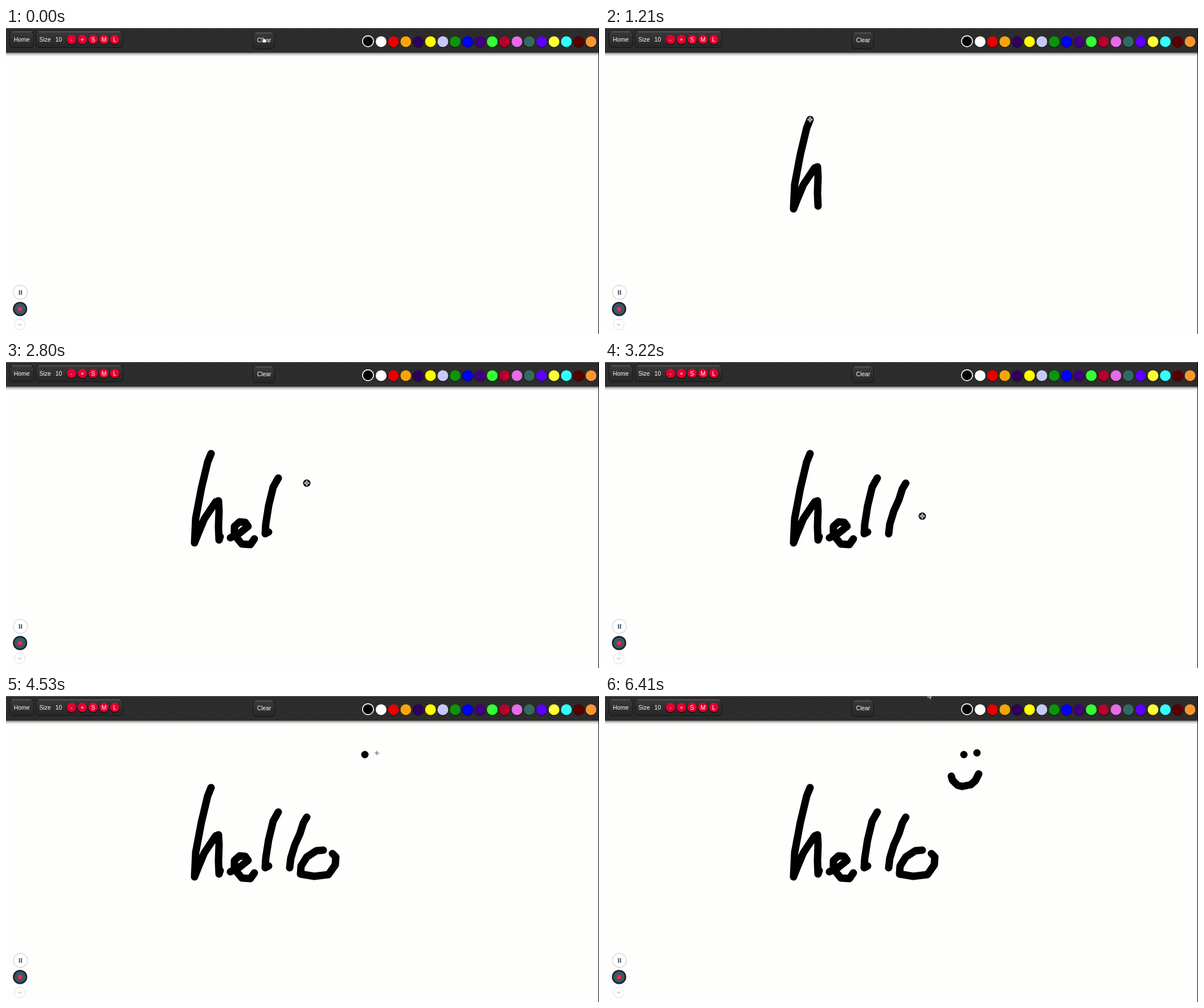
Recreate the animation shown at these times as an HTML page. Size 1041x538 px, loop 6.49 s.

```html
<!DOCTYPE html>
<html lang="en">
<head>
<meta charset="utf-8">
<title>Drawing board</title>
<style>
  html, body { margin: 0; width: 100%; height: 100%; overflow: hidden; background: #fefefc; }
  svg { display: block; width: 1041px; height: 538px; }
  text { font: 10.4px "Liberation Sans", Arial, sans-serif; fill: #fff; }
  .mid { text-anchor: middle; }
  .btn { fill: url(#face); stroke: #151515; }
  .ink { fill: none; stroke: #000; stroke-width: 13; stroke-linecap: round; stroke-linejoin: round; }
</style>
</head>
<body>
<svg viewBox="0 0 1041 538">
  <defs>
    <pattern id="weave" width="4" height="4" patternUnits="userSpaceOnUse">
      <rect width="4" height="4" fill="#303030"/>
      <path d="M0 0h1v1h1v1h1v1h1v1h-1v-1h-1v-1h-1v-1h-1z" fill="#222"/>
    </pattern>
    <linearGradient id="face" x2="0" y2="1">
      <stop stop-color="#393939"/><stop offset="1" stop-color="#262626"/>
    </linearGradient>
    <linearGradient id="shade" x2="0" y2="1">
      <stop stop-color="#000" stop-opacity=".65"/>
      <stop offset=".4" stop-color="#000" stop-opacity=".2"/>
      <stop offset="1" stop-color="#000" stop-opacity="0"/>
    </linearGradient>
  </defs>
  <rect width="1041" height="538" fill="#fefefc"/>
  <rect y="43" width="1041" height="7" fill="url(#shade)"/>
  <rect width="1041" height="43" fill="url(#weave)"/>
  <rect width="1041" height="1" fill="#666"/>
  <g id="bar"></g>
  <text x="13.7" y="23.7">Home</text>
  <text x="58.5" y="23.5">Size</text>
  <text x="86.7" y="23.5">10</text>
  <text x="440.7" y="25">Clear</text>

  <circle cx="25.3" cy="464.8" r="12.3" fill="#fff" stroke="#e2e2e4" stroke-width="2"/>
  <path d="M23.7 461v8M27.2 461v8" stroke="#4b5b6c" stroke-width="2"/>
  <circle cx="24.7" cy="494" r="11.2" fill="#3e5566" stroke="#1b2833" stroke-width="2.8"/>
  <rect x="21.2" y="490.7" width="7" height="7" fill="#e7313d"/>
  <circle cx="24.2" cy="521.3" r="9.4" fill="#fff" stroke="#ddd"/>
  <path d="M20.8 520l3.4 3 3.4-3" fill="none" stroke="#999"/>

  <g id="ink"></g>
  <g id="cross" fill="none">
    <path d="M-4.5 0h9M0-4.5v9" stroke="#fff" stroke-width="3"/>
    <path d="M-4 0h8M0-4v8" stroke="#444"/>
  </g>
  <path id="hand" d="M-1-3v5l-1-1-1 1 2 4h5l1-3v-3l-4-1v-2q-1-1-2 0z" fill="#fff" stroke="#222" stroke-width=".8"/>
  <path id="arrow" d="M0 0v9l2-2 1.6 3.7 1.6-.7-1.6-3.5h3z" fill="#222" stroke="#fff" stroke-width=".9"/>
  <path d="M1040.5 0v538" stroke="#000"/>
</svg>
<script>
const $ = id => document.getElementById(id);
const LOOP = 6490;

function add(parent, tag, attrs, text = "") {
  const el = document.createElementNS("http://www.w3.org/2000/svg", tag);
  for (const k in attrs) el.setAttribute(k, attrs[k]);
  el.textContent = text;
  return parent.appendChild(el);
}

const bar = $("bar");
for (const [x, y, width] of [[6.5, 6.5, 42], [53, 6.5, 152], [433.5, 8.5, 38]]) {
  add(bar, "rect", { x, y, width, height: 28, rx: 5, class: "btn" });
  add(bar, "path", { d: `M${x + 4} ${y + .2}h${width - 8}`, stroke: "#737373" });
}
[..."-+SML"].forEach((label, i) => {
  const x = 115 + i * 19;
  add(bar, "circle", { cx: x, cy: 20.8, r: 8.8, fill: "#111" });
  add(bar, "circle", { cx: x, cy: 20, r: 8.2, fill: "#e5002f" });
  add(bar, "text", { x, y: 23.5, class: "mid" }, label);
});
add(bar, "circle", { cx: 635.5, cy: 23.2, r: 9.6, fill: "#000", stroke: "#fff", "stroke-width": 1.7 });
("#fff #e80000 #f9a50a #2d0060 #ff0 #c8c8f8 #0a960a #00f #400080 #3f3 #b8002c " +
 "#e66be6 #336b60 #5b00ff #ff3 #3ff #590000 #fa9632").split(" ").forEach((fill, i) => {
  const cx = 658.5 + i * 21.68;
  add(bar, "circle", { cx, cy: 24.6, r: 10.2, fill: "#151515" });
  add(bar, "circle", { cx, cy: 24, r: 9.5, fill });
});

// Pen strokes: start time, end time, points sampled at even intervals
const strokes = [
  [700, 1250, "360,161 354,176 343,222 333,275 331,318 338,300 348,276 368,246 373,244 374,262 373,290 374,313 376,307"],
  [1500, 1960, "394,309 410,301 425,289 420,282 410,281 401,289 401,304 414,320 429,321 436,311"],
  [2180, 2440, "478,204 469,220 461,253 456,285 455,302 461,299"],
  [2800, 3030, "528,213 522,223 516,242 507,262 500,285 498,302"],
  [3180, 3590, "557,271 545,272 528,283 518,299 517,313 541,317 566,314 578,297 579,283 573,277"],
  [4240, 4300, "630,103"],
  [4580, 4640, "653,100"],
  [5190, 5560, "608,141 610,148 619,157 627,159 642,156 650,149 656,137"]
].map(([start, end, list]) => ({
  start, end,
  pts: list.split(" ").map(p => p.split(",").map(Number)),
  el: add($("ink"), "path", { class: "ink" })
}));

// The pointer waits at a stroke's first point, then glides to the next stroke
const stops = [
  { end: 30, pts: [[452, 20]] },
  ...strokes,
  { start: 6410, end: LOOP, pts: [[567, -6]] }
];

function pointer(t) {
  const i = Math.max(0, stops.findLastIndex(s => t >= (s.start ?? 0)));
  const now = stops[i], next = stops[i + 1];
  if (t < now.end || !next) return now.pts[0];
  const u = (t - now.end) / (next.start - now.end);
  const k = u * u * (3 - 2 * u);
  const from = now.pts.at(-1), to = next.pts[0];
  return from.map((v, j) => v + (to[j] - v) * k);
}

function draw() {
  const t = performance.now() % LOOP;
  for (const { start, end, pts, el } of strokes) {
    const u = Math.min(1, (t - start) / (end - start));
    const shown = u < 0 ? [] : pts.slice(0, Math.floor(u * (pts.length - 1)) + 1);
    el.setAttribute("d", shown.length ? `M${shown[0]}L${shown.join(" ")}` : "");
  }
  const [x, y] = pointer(t);
  const kind = y > 43 ? "cross" : t < 1000 ? "hand" : "arrow";
  for (const id of ["cross", "hand", "arrow"]) {
    $(id).style.display = id === kind ? "" : "none";
    $(id).setAttribute("transform", `translate(${x} ${y})`);
  }
  requestAnimationFrame(draw);
}
draw();
</script>
</body>
</html>
```
